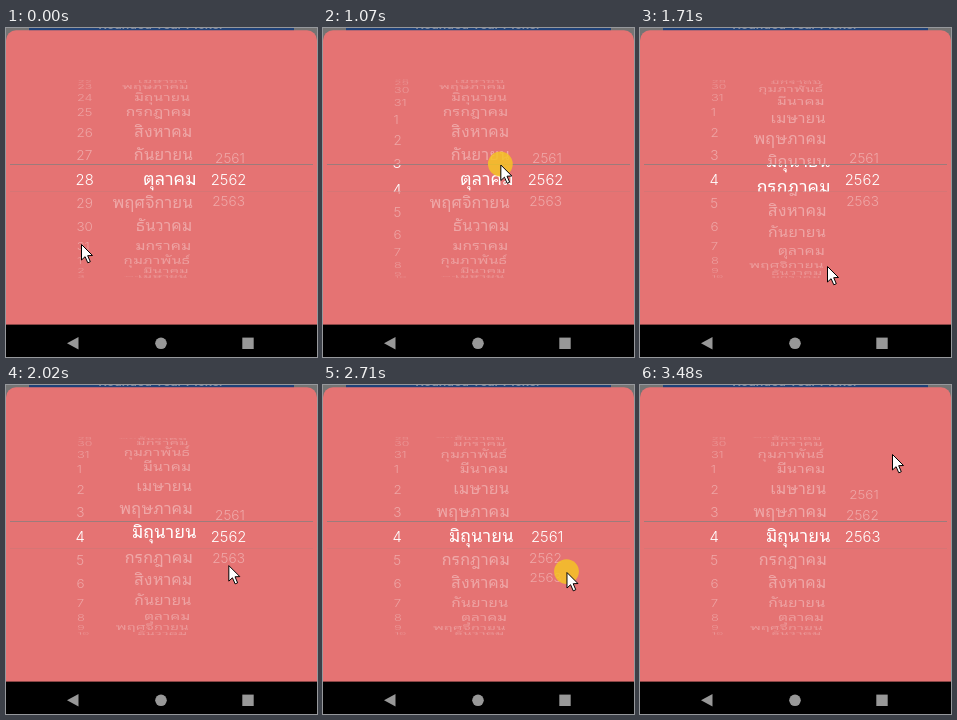
Recreate the animation shown at these times as an HTML page with a canvas. Size 311x329 px, loop 3710 ms.

```html
<!DOCTYPE html>
<html lang="th">
<head>
<meta charset="utf-8">
<title>Date picker</title>
<style>
html, body { margin: 0; width: 100%; height: 100%; overflow: hidden; background: #000; }
canvas { display: block; width: 311px; height: 329px; }
</style>
</head>
<body>
<canvas id="stage"></canvas>
<script>
const W = 311, H = 329, LOOP = 3710;
const START = 300, TICK = 77.6, TICKS = 41;
const canvas = document.getElementById('stage');
const dpr = window.devicePixelRatio || 1;
canvas.width = W * dpr;
canvas.height = H * dpr;
const ctx = canvas.getContext('2d');

const MID = 151, BAND = [137, 163.5], ZOOM = 1.08, STEP = Math.PI / 15;
const DIGITS = '300 13.7px Inter, Roboto, sans-serif';
const THAI = '"Noto Sans Thai Looped", "Noto Looped Thai", "Noto Sans Thai", "Noto Sans", sans-serif';
const MONTHS = ['มกราคม', 'กุมภาพันธ์', 'มีนาคม', 'เมษายน', 'พฤษภาคม', 'มิถุนายน',
  'กรกฎาคม', 'สิงหาคม', 'กันยายน', 'ตุลาคม', 'พฤศจิกายน', 'ธันวาคม'];

// One size for every month, so that any Thai font fills the column alike.
ctx.font = '300 100px ' + THAI;
const thaiSize = Math.min(22, Math.max(13, 4950 / ctx.measureText('ตุลาคม').width));
const MONTH_FONT = `300 ${thaiSize.toFixed(2)}px ${THAI}`;

const mod = (n, m) => ((n % m) + m) % m;
const clamp = u => Math.min(1, Math.max(0, u));
const linear = u => u;
const smooth = u => u * u * (3 - 2 * u);
const easeOut = u => 1 - (1 - u) ** 3;
const fling = u => 1 - (1 - u ** 1.9) ** 4;

// A wheel turns by `by` rows between `from` and `to`.
const wheels = [
  { x: 70.3, axis: 79, align: 'left', font: DIGITS, radius: 118, first: 28,
    label: n => String(mod(n - 1, 31) + 1),
    turns: [{ from: 300, to: 1400, by: 7, ease: fling }] },
  { x: 187, axis: 143, align: 'right', font: MONTH_FONT, radius: 118, first: 10,
    label: n => MONTHS[mod(n - 1, 12)],
    turns: [{ from: 1130, to: 2400, by: -4, ease: easeOut }] },
  { x: 239, axis: 222, align: 'right', font: DIGITS, radius: 104, first: 2562,
    label: n => n >= 2561 && n <= 2563 ? String(n) : '',
    turns: [{ from: 2480, to: 2700, by: -1, ease: smooth }, { from: 3010, to: 3400, by: 2, ease: smooth }] }
];

// The pointer glides to each place; `down` marks a drag.
const home = { x: 75, y: 216 };
const glides = [
  { from: 300, to: 760, x: 92, y: 104, ease: linear, down: true },
  { from: 760, to: 1060, x: 177, y: 133, ease: smooth },
  { from: 1060, to: 1540, x: 187, y: 238, ease: linear, down: true },
  { from: 1860, to: 2010, x: 223, y: 179, ease: linear },
  { from: 2010, to: 2460, x: 236, y: 148, ease: smooth },
  { from: 2460, to: 3010, x: 245, y: 195, ease: easeOut, down: true },
  { from: 3010, to: 3440, x: 252, y: 69, ease: smooth, down: true }
];

const progress = (part, t) => part.ease(clamp((t - part.from) / (part.to - part.from)));

function heldTime(t) {
  if (t < START) return 0;
  return START + TICK * Math.min(TICKS, Math.floor((t - START) / TICK + 0.15));
}

const wheelPos = (wheel, t) =>
  wheel.turns.reduce((pos, turn) => pos + turn.by * progress(turn, t), wheel.first);

function pointerAt(t) {
  let { x, y } = home;
  for (const glide of glides) {
    const k = progress(glide, t);
    x += (glide.x - x) * k;
    y += (glide.y - y) * k;
  }
  return { x, y, down: glides.some(g => g.down && t > g.from && t < g.to) };
}

function drawWheel(wheel, pos, selected) {
  ctx.font = wheel.font;
  ctx.textAlign = wheel.align;
  ctx.fillStyle = '#fff';
  for (let n = Math.ceil(pos - 7.3); n <= pos + 7.3; n++) {
    const angle = (n - pos) * STEP, cos = Math.cos(angle);
    if (cos < 0.03) continue;
    const depth = 1 / (1 + 0.22 * (1 - cos));
    ctx.save();
    ctx.globalAlpha = selected ? 1 : 0.38 * Math.sqrt(cos);
    ctx.translate(wheel.axis, MID + wheel.radius * Math.sin(angle) * depth);
    ctx.scale(depth, depth * cos);
    ctx.fillText(wheel.label(n), wheel.x - wheel.axis, 5.2);
    ctx.restore();
  }
}

function clipped(rects, draw) {
  ctx.save();
  ctx.beginPath();
  for (const [top, bottom] of rects) ctx.rect(0, top, W, bottom - top);
  ctx.clip();
  draw();
  ctx.restore();
}

function drawWheels(t) {
  for (const wheel of wheels) {
    const pos = wheelPos(wheel, t);
    clipped([[49, BAND[0]], [BAND[1], 252]], () => drawWheel(wheel, pos, false));
    clipped([BAND], () => {
      ctx.translate(wheel.axis, MID);
      ctx.scale(ZOOM, ZOOM);
      ctx.translate(-wheel.axis, -MID);
      drawWheel(wheel, pos, true);
    });
  }
}

function polygon(points) {
  ctx.beginPath();
  points.forEach(([x, y]) => ctx.lineTo(x, y));
  ctx.closePath();
}

function disc(x, y, r, color) {
  ctx.fillStyle = color;
  ctx.beginPath();
  ctx.arc(x, y, r, 0, Math.PI * 2);
  ctx.fill();
}

function drawScreen() {
  ctx.fillStyle = '#747474';
  ctx.fillRect(0, 0, W, 20);
  ctx.fillStyle = '#1f4278';
  ctx.fillRect(23, 0, 265, 4);
  ctx.font = '500 13.5px Roboto, sans-serif';
  ctx.textAlign = 'center';
  ctx.fillStyle = '#7f8aa0';
  ctx.fillText('Rounded Year Picker', 155, 1.2);

  ctx.fillStyle = '#e57373';
  ctx.beginPath();
  ctx.roundRect(0, 2.3, W, 310, 10);
  ctx.fill();

  ctx.fillStyle = '#000';
  ctx.fillRect(0, 296.6, W, 33);
  ctx.fillStyle = '#989898';
  polygon([[61, 315.3], [72.5, 309], [72.5, 321.6]]);
  ctx.fill();
  ctx.fillRect(236.3, 309.6, 11.4, 11.4);
  disc(155, 315.3, 5.8, '#989898');
}

function drawRules() {
  ctx.fillStyle = 'rgba(127,127,127,.7)';
  ctx.fillRect(4, 136, 303, 1);
  ctx.fillStyle = 'rgba(127,127,127,.15)';
  ctx.fillRect(4, 163, 303, 1);
}

function drawPointer(t) {
  const { x, y, down } = pointerAt(t);
  if (down) disc(x, y - 0.5, 12.4, 'rgba(244,195,38,.85)');
  ctx.save();
  ctx.translate(x + 0.5, y + 0.5);
  polygon([[0, 0], [0, 15.5], [3.6, 12.2], [6.3, 18.3], [8.8, 17.2], [6.2, 11.2], [11, 11]]);
  ctx.fillStyle = '#fff';
  ctx.fill();
  ctx.strokeStyle = '#000';
  ctx.lineWidth = 1;
  ctx.stroke();
  ctx.restore();
}

function render(t) {
  ctx.setTransform(dpr, 0, 0, dpr, 0, 0);
  drawScreen();
  drawWheels(t);
  drawRules();
  drawPointer(t);
}

const begin = performance.now();
function tick() {
  render(heldTime((performance.now() - begin) % LOOP));
  requestAnimationFrame(tick);
}
tick();
</script>
</body>
</html>
```
